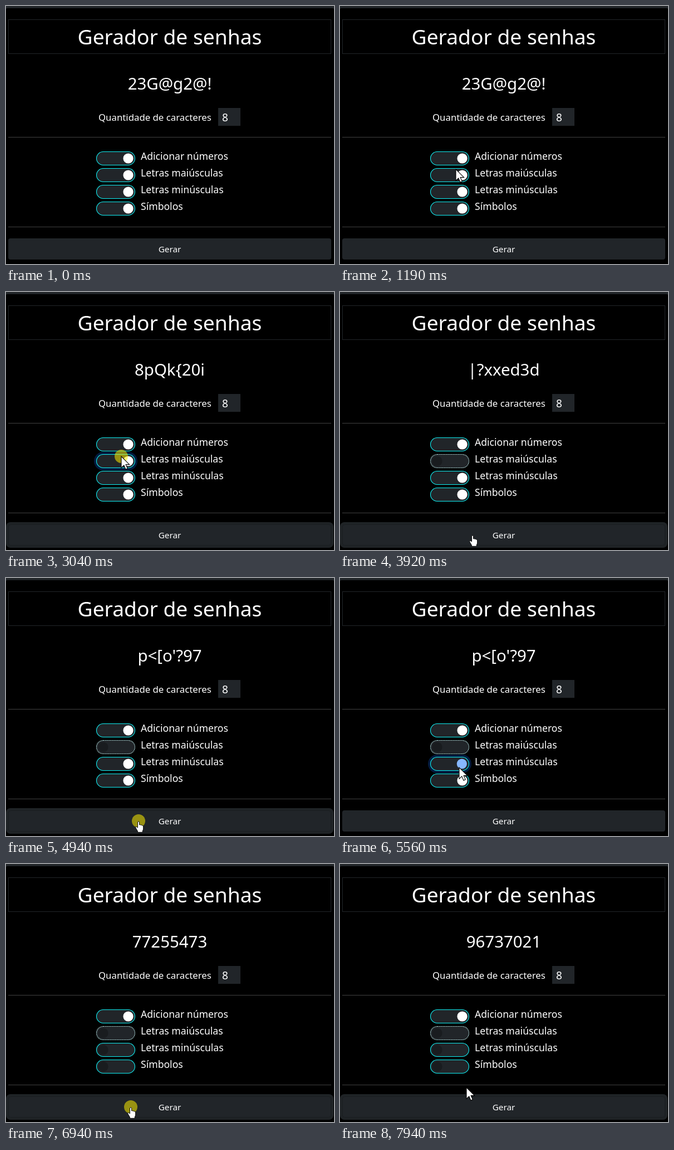
These frames come from a looping animation (589x463 px, 8000 ms). An HTML page:

```html
<!DOCTYPE html>
<html lang="pt-BR">
<head>
<meta charset="utf-8">
<title>Gerador de senhas</title>
<style>
  html, body { margin: 0; width: 100%; height: 100%; overflow: hidden; background: #000; }
  svg { display: block; width: 100%; height: 100%; }
  text { font-family: "Noto Sans", "Open Sans", sans-serif; fill: #fff; white-space: pre; }
  .mid { text-anchor: middle; }
</style>
</head>
<body>
<svg viewBox="0 0 589 463">
  <rect width="589" height="463" fill="#212529"/>
  <path d="M0 463V6Q0 4 2 4H587Q589 4 589 6V463Z"/>
  <rect x="4.5" y="24.5" width="579" height="61" fill="none" stroke="#212529"/>
  <text class="mid" x="294" y="69" font-size="37.2">Gerador de senhas</text>
  <text class="mid" id="pass" x="294" y="150" font-size="29.4"></text>
  <text x="166" y="206" font-size="16.8">Quantidade de caracteres</text>
  <rect x="381" y="183" width="40" height="32" fill="#212529"/>
  <text x="388" y="206.5" font-size="19">8</text>
  <path d="M4 235.5H584M4 396.5H584" stroke="#404040"/>
  <g id="rows"></g>
  <rect x="4" y="417" width="580" height="38" rx="4" fill="#212529"/>
  <g id="halo">
    <rect y="413" width="588" height="46" rx="8" fill="#1f2326"/>
    <rect x="4.5" y="417.5" width="579" height="37" rx="4" fill="#212529" stroke="#1a1e21"/>
  </g>
  <text class="mid" x="294" y="442" font-size="15.3">Gerar</text>
  <g id="mouse">
    <circle id="click" r="12" fill="#fe0" opacity=".54"/>
    <path id="arrow" d="M0 0V17L4 13.2 6.6 19.4 9.4 18.2 6.8 12.2H12.2Z" transform="scale(1.2)" fill="#fff" stroke="#000" stroke-width=".9"/>
    <path id="hand" d="M-1.5 12V1.8Q0 0 1.5 1.8V7Q3 5.8 4.3 7.5Q6 6.6 7 8.3Q8.6 8 8.6 10V14Q8.6 16 7.2 18V20.3H-1.5V18.5L-5.3 12Q-5.3 9.5-3.5 10.5Z" fill="#fff" stroke="#000" stroke-width=".9"/>
  </g>
</svg>
<script>
const LOOP = 8000, HOLD = 180, LAG = 70, SLIDE = 150, FADE = 100;
const ENTRY = [336, 458];
const $ = id => document.getElementById(id);

const switches = [
  { label: 'Adicionar números', chars: '0123456789' },
  { label: 'Letras maiúsculas', chars: 'ABCDEFGHIJKLMNOPQRSTUVWXYZ', dotted: true },
  { label: 'Letras minúsculas', chars: 'abcdefghijklmnopqrstuvwxyz' },
  { label: 'Símbolos', chars: '!?@#$%&*[]{}<>|' }
];

// Each step moves the pointer, then clicks a switch (row) or the button (gen).
const steps = [
  { at: 340, ms: 650, to: [208, 293] },
  { at: 1190, ms: 210, to: [205, 272] },
  { at: 1570, ms: 170, to: [243, 451], press: [2020], gen: ['8pQk{20i'] },
  { at: 2400, ms: 360, to: [207, 295], press: [2970], row: 1 },
  { at: 3200, ms: 370, to: [238, 436], press: [3640, 4320, 4800], gen: ['|?xxed3d', '', "p<[o'?97"] },
  { at: 5000, ms: 350, to: [214, 340], press: [5370], row: 2 },
  { at: 5650, ms: 200, to: [216, 364], press: [5900], row: 3 },
  { at: 6080, ms: 310, to: [224, 436], press: [6460, 6800, 7200, 7470], gen: ['', '77255473', '', '96737021'] },
  { at: 7840, ms: 100, to: [227, 401] }
];

const clamp = v => Math.max(0, Math.min(1, v));
const ease = v => { v = clamp(v); return v * v * (3 - 2 * v); };
const mix = (a, b, k) => a + (b - a) * k;

let seed = 7;
const random = () => (seed = seed * 16807 % 2147483647) / 2147483647;

function invent(t) {
  const pool = switches.filter(s => !(s.off <= t)).map(s => s.chars).join('');
  return Array.from({ length: 8 }, () => pool[Math.floor(random() * pool.length)]).join('');
}

// Focus lasts from the first press of a step until the next step's press.
const active = steps.filter(s => s.press);
const passwords = [{ at: 0, word: '23G@g2@!' }];
active.forEach((s, i) => {
  s.focus = s.press[0];
  s.blur = i + 1 < active.length ? active[i + 1].press[0] + LAG : LOOP;
  if (s.row) Object.assign(switches[s.row], { focus: s.focus, off: s.focus + HOLD, blur: s.blur });
  else s.press.forEach((at, j) => passwords.push({ at: at + LAG, word: s.gen[j] || invent(at) }));
});
const presses = active.flatMap(s => s.press);

const focusLevel = (t, s) =>
  s.focus ? Math.min(clamp((t - s.focus) / LAG), 1 - clamp((t - s.blur) / FADE)) : 0;

function add(parent, tag, attrs) {
  const el = document.createElementNS('http://www.w3.org/2000/svg', tag);
  for (const k in attrs) el.setAttribute(k, attrs[k]);
  return parent.appendChild(el);
}

switches.forEach((s, i) => {
  const g = add($('rows'), 'g', { transform: `translate(0 ${i * 30})` });
  s.ring = add(g, 'rect', { x: 158, y: 257, width: 78, height: 33, rx: 16.5, fill: '#031b3f' });
  s.body = add(g, 'rect', { x: 162.5, y: 261.5, width: 69, height: 24, rx: 12, fill: '#212529', 'stroke-width': 1.1 });
  s.knob = add(g, 'circle', { cy: 273.5, r: 9.1 });
  add(g, 'text', { x: 242, y: 276, 'font-size': 17.6 }).textContent = s.label;
});

function drawSwitch(s, t) {
  const off = t >= s.off, dots = off && s.dotted;
  s.ring.setAttribute('opacity', focusLevel(t, s));
  s.knob.setAttribute('cx', mix(219.5, 174.5, off ? ease((t - s.off) / SLIDE) : 0));
  s.knob.setAttribute('fill', !off ? '#fff' : t < s.blur ? '#86b7fe' : '#191c1f');
  s.body.setAttribute('stroke', dots ? '#c4f4f4' : '#10f0f4');
  s.body.setAttribute('stroke-dasharray', dots ? '1.6 1' : 'none');
}

function position(t) {
  return steps.reduce(([x, y], s) => {
    const k = ease((t - s.at) / s.ms);
    return [mix(x, s.to[0], k), mix(y, s.to[1], k)];
  }, ENTRY);
}

const show = (id, on) => { $(id).style.display = on ? '' : 'none'; };

function draw(t) {
  $('pass').textContent = passwords.filter(p => p.at <= t).pop().word;
  switches.forEach(s => drawSwitch(s, t));
  $('halo').setAttribute('opacity', Math.max(...active.filter(s => s.gen).map(s => focusLevel(t, s))));
  const [x, y] = position(t), onButton = y >= 417 && y < 455;
  $('mouse').setAttribute('transform', `translate(${x} ${y})`);
  show('mouse', t >= steps[0].at);
  show('click', presses.some(p => t >= p && t < p + HOLD));
  show('arrow', !onButton);
  show('hand', onButton);
}

const start = performance.now();
function tick() {
  draw((performance.now() - start) % LOOP);
  requestAnimationFrame(tick);
}
tick();
</script>
</body>
</html>
```
